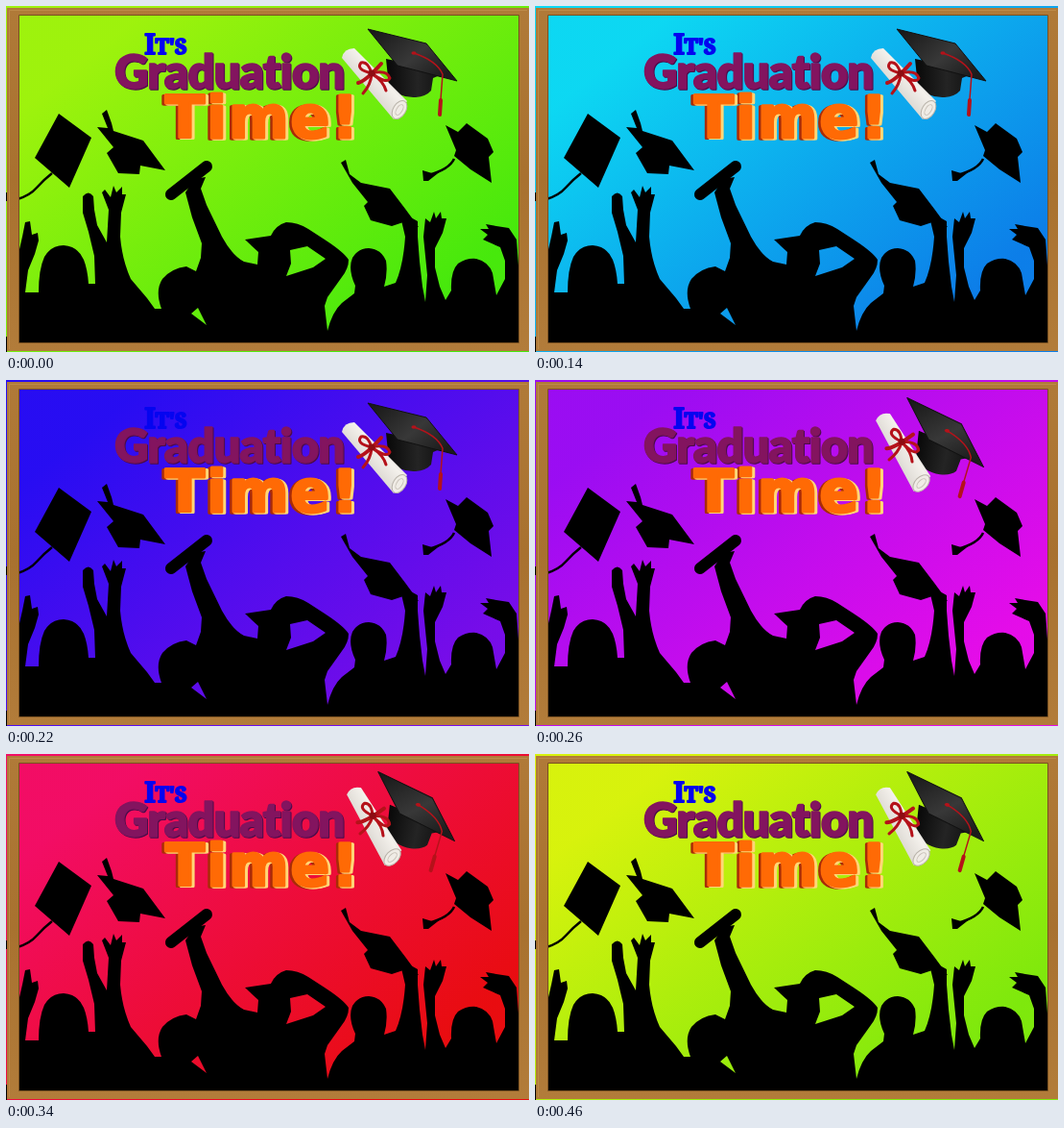
An HTML page for the animation above (0.48 s loop, 545 by 360 pixels).

```html
<!DOCTYPE html>
<html lang="en">
<head>
<meta charset="utf-8">
<title>Graduation Time</title>
<style>
  html, body { margin: 0; width: 100%; height: 100%; overflow: hidden; }
  svg { display: block; width: 545px; height: 360px; }
  text { font-family: Lato, sans-serif; font-weight: 900; stroke-linejoin: round; }
  .its { font-family: "Noto Serif", serif; fill: #0505f0; stroke: #0505f0; stroke-width: 2; }
  .grad { font-size: 49px; letter-spacing: -.9px; stroke-width: 1.4; }
  .time { font: bold 60px "DejaVu Sans", sans-serif; letter-spacing: 2.2px; stroke-width: 3; }
  .red { fill: none; stroke: #b5121a; stroke-linecap: round; stroke-linejoin: round; }
</style>
</head>
<body>
<svg viewBox="0 0 545 360">
  <defs>
    <linearGradient id="sky" gradientUnits="userSpaceOnUse" x1="140" y1="10" x2="400" y2="340">
      <stop/><stop offset=".5"/><stop offset="1"/>
    </linearGradient>
    <linearGradient id="wood" x2="0" y2="1">
      <stop stop-color="#b07a38"/><stop offset=".5" stop-color="#a8712f"/><stop offset="1" stop-color="#b27c3a"/>
    </linearGradient>
    <linearGradient id="board" x2="1" y2=".7">
      <stop stop-color="#161616"/><stop offset=".6" stop-color="#383838"/><stop offset="1" stop-color="#1c1c1c"/>
    </linearGradient>
    <linearGradient id="skull">
      <stop stop-color="#080808"/><stop offset=".5" stop-color="#242424"/><stop offset="1" stop-color="#0c0c0c"/>
    </linearGradient>
    <linearGradient id="paper" x1=".75" y1=".25" x2=".35" y2=".65">
      <stop stop-color="#d2cfcb"/><stop offset=".4" stop-color="#f4f1ec"/><stop offset="1" stop-color="#d8d4ce"/>
    </linearGradient>
  </defs>

  <rect width="545" height="360" fill="url(#sky)"/>

  <g id="crowd">
    <!-- people -->
    <path d="M12 350V262L17 240 20 225 25 224 27 238 33 236 34 244 30 258 23 275 20 298H34
      Q34 274 40 261Q47 249 60 249Q75 250 81 264Q85 274 86 289H93L92 260 86 235 80 215 80 198
      Q86 191 91 198L92 212 95 228 105 246 107 212 100 194 103 191 109 199 112 187 115 194
      121 188 121 196 125 196 120 215 119 240 Q121 264 130 284L147 304 155 315H162
      Q155 296 163 284Q172 273 188 271L198 276 203 262 204 247 194 220 187 194 196 180 208 178
      203 190 209 207 225 240 Q236 260 248 266L262 269 263 256 249 243 276 239
      Q281 228 292 225Q304 225 315 232L332 243 Q352 256 357 264Q357 273 350 282L335 303 332 312 335 338
      Q340 318 350 309L363 299 364 291 Q356 274 361 262Q367 252 378 252Q391 253 396 265
      Q398 278 394 292L406 288 Q414 270 416 240L412 223 420 219 429 224 429 240 431 266 434 292 437 308
      439 280 435 240 437 221 442 225 446 214 448 221 453 214 454 221 459 221 455 236 447 252
      447 272 452 292 458 306 464 296 Q463 276 471 268Q480 262 490 263Q503 266 507 278L511 301
      520 284 520 265 515 251 497 243 502 238 494 232 503 232 500 227 511 229 524 231
      532 243 534 270 536 350Z"/>
    <!-- diploma -->
    <path d="M172 196L209 167" stroke="#000" stroke-width="12" stroke-linecap="round"/>
    <!-- thrown caps -->
    <path d="M55 112L89 137 66 189 30 158Z
      M95 126L106 127 100 112 105 108 110 122 112 130 143 140 166 171 140 166 139 175 117 174 105 153 112 147Z
      M458 124L471 131 480 122 502 138 508 152 503 157 506 184 484 170 467 156 469 150Z
      M349 163L354 160 358 175 370 184 400 190 416 211 430 230 414 225 402 229 380 223 373 208 377 204 361 184Z
      M434 171L444 174 454 171 440 182 435 182Z"/>
    <path d="M48 174Q39 181 32 189T12 201M467 159Q462 170 440 176" fill="none" stroke="#000" stroke-width="2.5"/>
    <path d="M0 194h1v9H0zM0 344h1v16H0z"/>
  </g>
  <!-- openings between the figures -->
  <path fill="url(#sky)" d="M296 254L314 250 333 263 320 272 292 281 297 268ZM193 320L200 314 209 332Z"/>

  <!-- wooden frame -->
  <path fill="url(#wood)" fill-rule="evenodd" d="M1 2H545V359H1ZM14 10V350H534V10Z"/>
  <path fill="none" stroke="#795020" d="M13.5 9.5H534.5V350.5H13.5Z"/>
  <path fill="none" stroke="#bd8a48" d="M3.5 357V4.5H543"/>

  <text class="its" x="144.5" y="50" font-size="28">I<tspan font-size="21.5">T'S</tspan></text>
  <text class="grad" x="114" y="87" fill="#4b0c4a" stroke="#4b0c4a">Graduation</text>
  <text class="grad" x="113" y="86" fill="#83145f" stroke="#83145f">Graduation</text>
  <g id="time"></g>

  <g id="prize">
    <path fill="url(#skull)" d="M396 55L399 84Q410 96 427 95Q438 94 443 88L445 75 462 68Z"/>
    <path fill="url(#board)" stroke="#111" stroke-linejoin="round" d="M377 24L438 39 470 78 408 62Z"/>
    <path class="red" stroke-width="1.5" d="M425 49Q449 57 455 71L453 97"/>
    <path class="red" stroke-width="4" d="M453 98L452 113"/>
    <ellipse cx="425" cy="49" rx="2.6" ry="1.8" fill="#b5121a"/>
    <path fill="url(#paper)" d="M350 54Q352 44 363 44L418 99 404 118Z"/>
    <ellipse cx="410" cy="108" rx="6.5" ry="10.5" transform="rotate(32 410 108)" fill="#f0ece6" stroke="#b9b3aa"/>
    <ellipse cx="410" cy="108" rx="3" ry="6" transform="rotate(32 410 108)" fill="none" stroke="#c8c1b8"/>
    <path class="red" stroke-width="4" d="M367 80Q375 78 391 60"/>
    <path class="red" stroke-width="3" d="M381 70Q364 66 370 59Q377 57 381 70Q397 66 400 75Q397 82 381 70M381 71Q380 82 372 91M382 71Q393 78 396 88"/>
    <circle cx="381" cy="70" r="3.5" fill="#8d0c12"/>
  </g>
</svg>
<script>
  const LOOP = 480, STEP = 20;
  const stops = document.querySelectorAll("#sky stop");
  const prize = document.getElementById("prize");

  // Bevelled lettering: dark side, light side, face
  const layers = [[-2.5, 1, "#a92c08"], [-1.2, .5, "#a92c08"], [3, 1, "#ffd778"], [1.5, .5, "#ffd778"], [0, 0, "#ff6a05"]];
  document.getElementById("time").innerHTML = layers.map(([dx, dy, color]) =>
    `<text class="time" x="166" y="137" transform="translate(${dx} ${dy})" fill="${color}" stroke="${color}">Time!</text>`
  ).join("");

  function draw(now) {
    const step = Math.floor((now % LOOP) / STEP);
    const hue = 93 + step * 15;
    stops.forEach((stop, i) =>
      stop.setAttribute("stop-color", `hsl(${hue + (i - 1) * 11}, 90%, ${50 - i}%)`));
    prize.setAttribute("transform", step < 12 ? "" : "translate(0 -5) rotate(12 385 75)");
    requestAnimationFrame(draw);
  }
  draw(performance.now());
</script>
</body>
</html>
```
